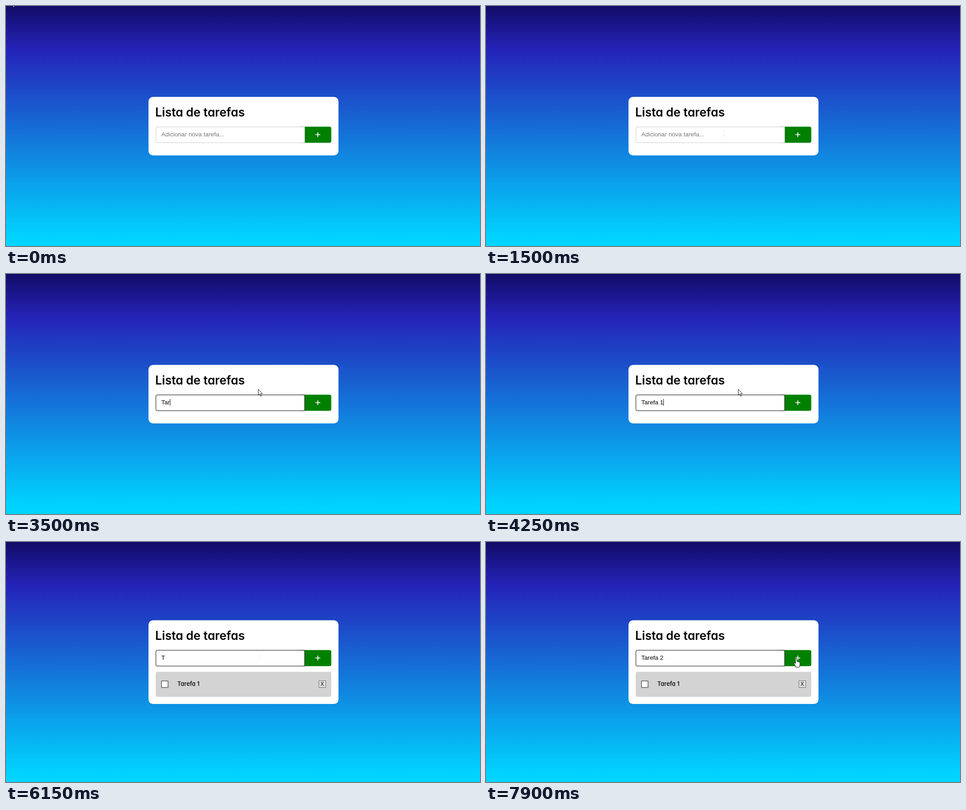
An HTML page that plays this animation: 1053x532 px, repeating every 8000 ms.

```html
<!DOCTYPE html>
<html lang="pt">
<head>
<meta charset="utf-8">
<title>Lista de tarefas</title>
<style>
  html, body { margin: 0; width: 100%; height: 100%; overflow: hidden; }
  body { background: linear-gradient(#120c68 0, #2523b8 96px, #00d4ff 515px); }
  svg { display: block; width: 1053px; height: 532px; }
  text { white-space: pre; }
  .round { font-family: Inter, sans-serif; font-feature-settings: "cv11"; }
  .title { font-size: 26.4px; font-weight: 600; }
  .label { font-size: 13px; font-weight: 500; }
  .field { font: 13.6px "Liberation Sans", Arial, sans-serif; }
  .close { font: 12px "Liberation Sans", Arial, sans-serif; text-anchor: middle; }
  #pointer path { stroke-width: .9; stroke-linejoin: round; }
</style>
</head>
<body>
<svg viewBox="0 0 1053 532">
  <g id="card">
    <rect id="panel" x="316.6" y="173.6" width="422" rx="10" fill="#fff"/>
    <text class="round title" x="331.6" y="217">Lista de tarefas</text>
    <rect x="650" y="239.6" width="72.6" height="35.7" rx="4" fill="green"/>
    <path id="box" d="M663.4 240H336a3 3 0 0 0-3 3v29a3 3 0 0 0 3 3H663.4z" fill="#fff"/>
    <path d="M687.4 257.2h10.6M692.7 251.9v10.6" stroke="#fff" stroke-width="1.8"/>
    <text id="hint" class="field" x="345" y="261" fill="#757575">Adicionar nova tarefa...</text>
    <text id="typed" class="field" x="345" y="261"></text>
    <rect id="caret" y="249" width="1" height="15"/>
    <g id="item">
      <rect x="332.6" y="287.7" width="390" height="55.5" rx="4" fill="#d3d3d3"/>
      <rect x="345.5" y="308" width="14.5" height="14.5" fill="#fff" stroke="#5c5c5c" stroke-width="1.5"/>
      <text class="round label" x="380.6" y="319">Tarefa 1</text>
      <rect x="695.3" y="307.5" width="15" height="15" fill="#e2e2e2" stroke="#6b6b6b"/>
      <text class="close" x="702.6" y="319.3">X</text>
    </g>
  </g>
  <g id="pointer">
    <path id="arrow" d="M.5 .5V13.7L3.6 10.9 5.8 16 7.8 15.1 5.6 10.2H9.8z" fill="#fff" stroke="#000"/>
    <path id="beam" d="M0 -4.5h4M2 -4.5v12M0 7.5h4" fill="none" stroke="#e9e9e9"/>
    <path id="hand" d="M-1.6 11V1.3a1.6 1.6 0 0 1 3.2 0V7q2.6-.8 2.8.6q2.4-.4 2.5 1q1.6 0 1.6 1.4v4q0 2-1.4 3.4v2h-8v-2q-2.5-2.8-4.2-6.2q-.6-1.6.8-1.6q1.2.2 2.7 2z" fill="#fff" stroke="#000"/>
  </g>
</svg>
<script>
  const LOOP = 8000, TICK = 50, BLINK = 450;
  const FOCUS = 2150, ADD = 4500;
  const $ = id => document.getElementById(id);
  const show = (id, on) => $(id).setAttribute('visibility', on ? 'visible' : 'hidden');

  const first = { text: 'Tarefa 1', start: 3000, span: 1250, ease: .75 };
  const second = { text: 'Tarefa 2', start: 5700, span: 1500, ease: .6 };

  // Typing starts hesitantly and settles into an even pace.
  const keyTime = (e, i) => e.start + e.span * (i / (e.text.length - 1)) ** e.ease;

  function ramp(t, from, to) {
    const k = Math.min(1, Math.max(0, (t - from) / (to - from)));
    return k * k * (3 - 2 * k);
  }
  const mix = ([x0, y0], [x1, y1], k) => [x0 + (x1 - x0) * k, y0 + (y1 - y0) * k];

  // Fly in, sweep round the card into the field, rest above it, then go to the button.
  function pointerAt(t) {
    const angle = -.93 - ramp(t, 900, 1600) * (2 * Math.PI - 1.86);
    const sweep = [476 + 130 * Math.cos(angle), 220 + 66 * Math.sin(angle)];
    let p = mix([11, -13], sweep, ramp(t, 150, 850));
    p = mix(p, [560, 255], ramp(t, 2400, 2700));
    p = mix(p, [689, 258], ramp(t, 7650, 7900));
    return p.map(Math.round);
  }

  function draw(t) {
    const added = t >= ADD, shift = added ? 0 : 28;
    $('card').setAttribute('transform', `translate(0 ${shift})`);
    $('panel').setAttribute('height', added ? 185.5 : 129.6);
    show('item', added);
    $('box').setAttribute('stroke', t >= FOCUS ? '#000' : '#ccc');

    const entry = added ? second : first;
    const value = [...entry.text].filter((c, i) => keyTime(entry, i) <= t).join('');
    const typed = $('typed');
    if (typed.textContent !== value) typed.textContent = value;
    show('hint', !value);

    const idle = added ? first.start + first.span : FOCUS;
    const lastKey = value ? keyTime(entry, value.length - 1) : idle;
    const width = value ? typed.getComputedTextLength() : 0;
    $('caret').setAttribute('x', Math.round(345 + width));
    show('caret', t >= FOCUS && Math.floor((t - lastKey) / BLINK) % 2 === 0);

    const [x, y] = pointerAt(t);
    const inRow = y >= 240 + shift && y < 275 + shift && x >= 333 && x < 723;
    const shape = !inRow ? 'arrow' : x < 664 ? 'beam' : 'hand';
    for (const id of ['arrow', 'beam', 'hand']) show(id, id === shape);
    $('pointer').setAttribute('transform', `translate(${x} ${y})`);
  }

  const start = performance.now();
  function frame() {
    const t = (performance.now() - start) % LOOP;
    draw(Math.floor(t / TICK) * TICK);
    requestAnimationFrame(frame);
  }
  draw(0);
  requestAnimationFrame(frame);
</script>
</body>
</html>
```
